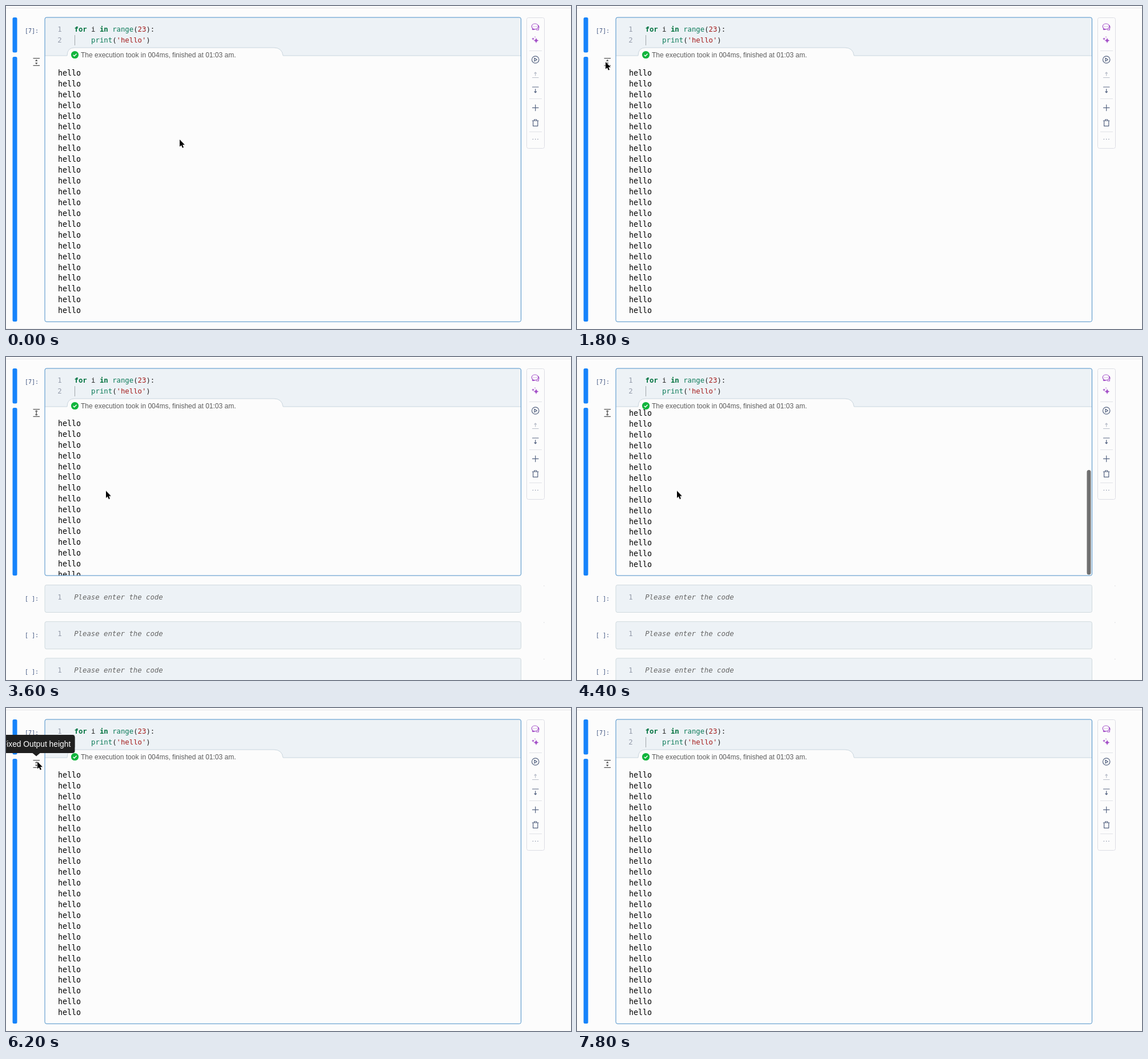
An HTML page that plays this animation: 989 px wide and 566 px high, repeating every 8 s.

```html
<!DOCTYPE html>
<html lang="en">
<head>
<meta charset="utf-8">
<title>Notebook output height</title>
<style>
  @property --scroll { syntax: '<number>'; inherits: true; initial-value: 0; }

  html, body { margin: 0; width: 100%; height: 100%; overflow: hidden; background: #fcfcfc; }
  svg { display: block; width: 989px; height: 566px; animation: scroll 8s step-end infinite; }

  text { white-space: pre; font-family: "DejaVu Sans Mono", monospace; font-size: 12.3px; fill: #222; }
  .sans { font-family: "Liberation Sans", Arial, sans-serif; }
  .prompt { font-size: 10px; fill: #3f5480; }
  .num { fill: #959cab; }
  .hint { font-style: italic; fill: #666; }
  .key { font-weight: bold; fill: #00713f; }
  .fn { fill: #0b7a58; }
  .lit { fill: #a51b1b; }
  #lines text { font-size: 13.3px; fill: #000; }

  .bar { fill: #1683fb; }
  .frame { fill: none; stroke: #4a8fc8; }
  .blank { fill: #edf2f6; stroke: #d0dade; }
  .line { fill: none; stroke: #566482; stroke-width: 1.2; stroke-linecap: round; stroke-linejoin: round; }
  .purple { stroke: #a451c8; }
  .rule { stroke: #e0e2e7; }

  .open, .fixed, .tip, .dots, .seven, .edge, #thumb, #lines, #cursor { animation: 8s step-end infinite; }
  .open { animation-name: open; }
  .fixed { animation-name: fixed; }
  .tip { animation-name: tip; }
  .dots { animation-name: dots; }
  .seven { animation-name: seven; }
  .edge { animation-name: edge; }
  #cursor { animation-name: cursor; }
  #lines { transform: translateY(calc(var(--scroll) * -1px)); }
  #thumb { transform: translateY(calc(var(--scroll) * .641px)); animation-name: thumb; }

  @keyframes open { 0%, 77.5%, 100% { opacity: 1 } 35% { opacity: 0 } }
  @keyframes fixed { 0%, 77.5%, 100% { opacity: 0 } 35% { opacity: 1 } }
  @keyframes tip { 0%, 40%, 85%, 100% { opacity: 0 } 25%, 70% { opacity: 1 } }
  @keyframes dots { 0%, 70%, 100% { opacity: 0 } 65% { opacity: 1 } }
  @keyframes seven { 0%, 70%, 100% { opacity: 1 } 65% { opacity: 0 } }
  @keyframes edge { 0% { opacity: 1 } 2.5%, 100% { opacity: 0 } }
  @keyframes thumb {
    0%, 72.5%, 100% { opacity: 0 }
    47.5% { opacity: .56 }
    65% { opacity: .4 }
    67.5% { opacity: .22 }
    70% { opacity: .1 }
  }
  @keyframes scroll {
    0%, 62.5%, 100% { --scroll: 0 }
    45% { --scroll: 1 }
    47.5% { --scroll: 22 }
    50% { --scroll: 85 }
    52.5% { --scroll: 150 }
    55% { --scroll: 170 }
    60% { --scroll: 90 }
  }
  @keyframes cursor {
    0% { transform: translate(304px, 234px) }
    5% { transform: translate(304px, 234px); animation-timing-function: steps(2) }
    10% { transform: translate(245px, 203px); animation-timing-function: steps(2) }
    15% { transform: translate(110px, 130px); animation-timing-function: steps(2) }
    20% { transform: translate(50px, 98px) }
    37.5% { transform: translate(50px, 98px); animation-timing-function: steps(2) }
    42.5% { transform: translate(175px, 234.5px) }
    62.5% { transform: translate(175px, 234.5px); animation-timing-function: steps(2) }
    67.5% { transform: translate(51px, 93px) }
    72.5% { transform: translate(55px, 94px) }
    85% { transform: translate(55px, 94px); animation-timing-function: steps(2) }
    90%, 100% { transform: translate(-20px, 120px) }
  }
</style>
</head>
<body>
<svg viewBox="0 0 989 566">
  <clipPath id="pane"><rect x="69" y="88" width="832" height="465"/></clipPath>

  <path d="M0 3.5H989" stroke="#e6e6e8"/>
  <path class="edge" d="M0 565.5H989" stroke="#eeeeef"/>

  <rect class="bar" x="11.5" y="20" width="8" height="61.5" rx="2.5"/>
  <g class="open">
    <rect class="bar" x="11.5" y="89" width="8" height="464" rx="2.5"/>
  </g>

  <g clip-path="url(#pane)"><g id="lines"></g></g>

  <!-- code area and status tab -->
  <rect x="68" y="20" width="833" height="67" rx="2" fill="#edf2f6"/>
  <path d="M68 87H107Q107 73 120 73H469Q483 73 485 87H901" fill="#fcfcfc" stroke="#cad6de"/>
  <g class="seven"><text class="prompt" x="33" y="47">[7]:</text></g>
  <g class="dots" id="grip" fill="#5a6a94"></g>
  <text class="num" x="90.3" y="45.3">1</text>
  <text class="num" x="90.3" y="64.3">2</text>
  <text x="119.5" y="45.3"><tspan class="key">for</tspan> i <tspan class="key">in</tspan> <tspan class="fn">range</tspan>(<tspan class="lit">23</tspan>):</text>
  <path d="M120.5 51V69" stroke="#a2a7ab"/>
  <text x="149.1" y="64.3"><tspan class="fn">print</tspan>(<tspan class="lit">'hello'</tspan>)</text>
  <circle cx="120.5" cy="85.5" r="6.6" fill="#10b53c"/>
  <path d="M117.6 85.7l2.1 2.1 3.8-4" fill="none" stroke="#fff" stroke-width="1.4"/>
  <text class="sans" x="131" y="89.5" style="font-size:12px;fill:#5c5c5c">The execution took in 004ms, finished at 01:03 am.</text>

  <!-- output at full height -->
  <g class="open">
    <rect class="frame" x="68" y="20" width="833.5" height="533.3" rx="3"/>
    <path d="M47.5 91.7H59M47.5 104.3H59M53.2 94.5V96.8M53.2 99.2V101.5" stroke="#555" stroke-width="1.3"/>
    <path d="M50.8 96.6L53.2 93.8 55.6 96.6ZM50.8 99.5L53.2 102.3 55.6 99.5Z" fill="#555"/>
  </g>

  <!-- output at fixed height -->
  <g class="fixed">
    <rect x="0" y="383" width="905" height="183" fill="#fcfcfc"/>
    <rect class="bar" x="11.5" y="89" width="8" height="294" rx="2.5"/>
    <rect class="frame" x="68" y="20" width="833.5" height="363" rx="3"/>
    <path d="M47.5 91.7H59M47.5 104.3H59M53.2 95V101" stroke="#555" stroke-width="1.3"/>
    <path d="M51 95.2H55.4L53.2 93.6ZM51 100.8H55.4L53.2 102.4Z" fill="#555" stroke="#555" stroke-width=".5"/>
    <g id="cells"></g>
  </g>
  <rect id="thumb" x="892.5" y="89" width="7" height="183.5" rx="3.5"/>

  <!-- toolbar -->
  <rect x="911.5" y="20.5" width="31" height="229" rx="3" fill="#fcfcfc" stroke="#dcdde4"/>
  <path class="rule" d="M916 78.5H938M916 162.5H938M916 220.5H938"/>
  <g class="line purple">
    <path d="M926 31c-3.5 0-5.7 2.1-5.7 4.8s2.2 4.8 5.7 4.8c3.4 0 5.6-2.1 5.6-4.8S929.4 31 926 31ZM921.5 39V41.4H924.5M931 33.5c2.5 1.7 2.4 4.6 1.2 5.8V42H928.5"/>
    <path d="M923.6 36h.1M926 36h.1M928.4 36h.1"/>
  </g>
  <path d="M928 55.8q.8 4 4.8 4.8-4 .8-4.8 4.8-.8-4-4.8-4.8 4-.8 4.8-4.8ZM922.6 55.2q.4 2 2.4 2.4-2 .4-2.4 2.4-.4-2-2.4-2.4 2-.4 2.4-2.4ZM926 53.2l.8 1.1-.8 1.1-.8-1.1Z" fill="#a451c8"/>
  <g class="line">
    <circle cx="926.7" cy="94" r="6.2"/>
    <path d="M925 91.2V96.8L929.4 94Z"/>
    <path d="M921.5 125.5H932M926.7 122V116M925 118L926.7 116.2 928.4 118" stroke="#b9bec9"/>
    <path d="M921.5 142H932M926.7 145.5V152M925 150L926.7 151.8 928.4 150"/>
    <path d="M921.5 178.3H932M926.7 173V183.6"/>
    <path d="M921.3 201H932M924.6 200.8V199H928.8V200.8M922.6 201.2V210.3H930.8V201.2"/>
    <path d="M922.3 233.3h.1M926.6 233.3h.1M930.9 233.3h.1"/>
  </g>

  <g class="tip">
    <path d="M-14 47H116.5Q120.5 47 120.5 51V75Q120.5 79 116.5 79H59.5L53 84.5 46.5 79H-14Z" fill="#202020"/>
    <g class="sans" text-anchor="middle">
      <text class="sans open" x="53" y="67.7" style="font-size:13.8px;fill:#fff">Fixed Output height</text>
      <text class="sans fixed" x="53" y="67.7" style="font-size:13.8px;fill:#fff">Auto Output height</text>
    </g>
  </g>

  <path id="cursor" d="M0 0V12.6L2.9 10 4.8 14.6 7 13.7 5 9.2H8.9Z" fill="#000" stroke="#fff" stroke-width="1" paint-order="stroke"/>
</svg>
<script>
  const fill = (id, count, make) => {
    document.getElementById(id).innerHTML = Array.from({ length: count }, (_, i) => make(i)).join('');
  };

  fill('lines', 23, i => `<text x="91" y="${121.8 + i * 18.93}">hello</text>`);

  fill('grip', 6, i => `<circle cx="${39.6 + i % 2 * 6}" cy="${27.5 + (i >> 1) * 5.2}" r="1.3"/>`);

  fill('cells', 3, i => {
    const y = 399.5 + i * 64.2;
    return `<rect class="blank" x="68" y="${y}" width="833.5" height="48" rx="3"/>
      <text class="prompt" x="33" y="${y + 27.2}">[ ]:</text>
      <text class="num" x="90.3" y="${y + 25.5}">1</text>
      <text class="hint" x="119.2" y="${y + 25.5}">Please enter the code</text>
      <rect x="941" y="${y + 1}" width="1.5" height="1" fill="#d5d6da"/>`;
  });
</script>
</body>
</html>
```
